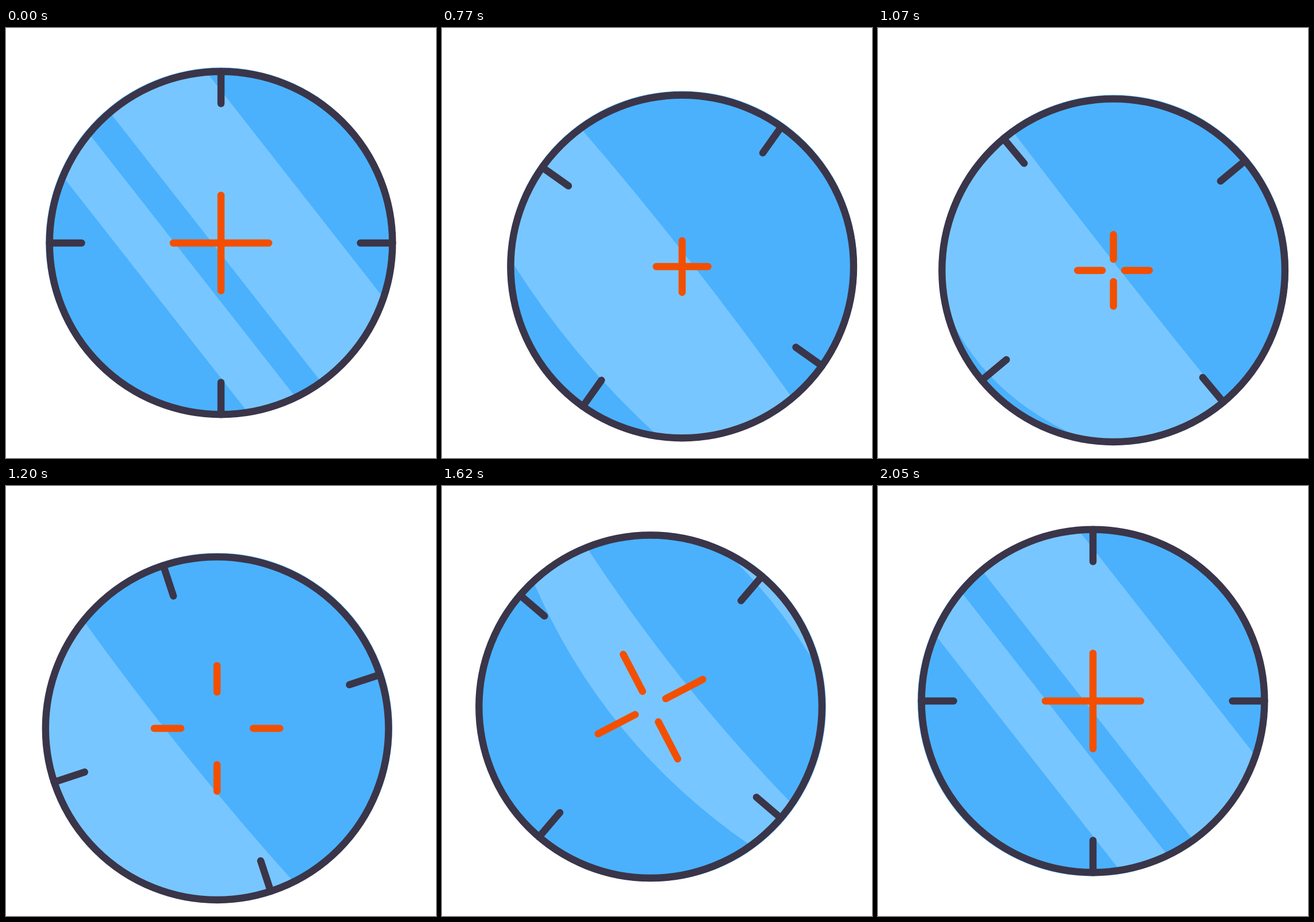
These frames come from a looping animation (748x748 px, 2070 ms). An HTML page with a canvas:

```html
<!DOCTYPE html>
<html lang="en">
<head>
<meta charset="utf-8">
<title>Scope</title>
<style>
  html, body { margin: 0; width: 100%; height: 100%; overflow: hidden; background: #fff; }
  canvas { display: block; width: 100vmin; height: 100vmin; }
</style>
</head>
<body>
<canvas id="stage" width="748" height="748"></canvas>
<script>
const ctx = document.getElementById('stage').getContext('2d');
const LOOP = 2070, HOME = 374, RAD = Math.PI / 180;
const BLUE = '#4bb1fd', SHINE = '#78c6ff', DARK = '#3a3549', ORANGE = '#f34f00';
const RING = 298.3, TICK = 242.5, STROKE = 12.4;

// Progress from 0 to 1 between two steps, plain or eased at both ends.
const ramp = (n, from, to) => Math.min(1, Math.max(0, (n - from) / (to - from)));
const ease = (n, from, to) => {
  const t = ramp(n, from, to);
  return t * t * (3 - 2 * t);
};
const mix = (a, b, t) => a + (b - a) * t;

// Out to the lower right, along a shallow arc to the left, then home.
function lensAt(n) {
  const out = ramp(n, 0, 11), across = ease(n, 20.4, 34.4);
  const arc = ramp(n, 12, 40), stay = 1 - ease(n, 40, 47.4);
  return {
    x: mix(43.7 * out, -46, across) * stay,
    y: (mix(41 * out, 39.5, arc) + 7.7 * Math.sin(Math.PI * arc)) * stay
  };
}

const tickAngle = n =>
  45 * ramp(n, 0, 14) + 45 * ease(n, 20, 34.2) + 180 * ramp(n, 40.06, 62);

// The cross shrinks, splits into four dashes, then spins shut.
function crossAt(n) {
  const shrink = ramp(n, 0, 12), split = ease(n, 18.4, 34.5), shut = ease(n, 40, 47.9);
  const inner = 98 * split * (1 - shut);
  const size = mix(mix(83 - 41.5 * shrink, 49, split), 83, shut);
  return { inner, outer: inner + size, spin: 90 * shut };
}

// A band edge: distance from the lens centre at its upper end, middle and lower end.
const edge = (mid, bow = 0, tilt = 0) => ({ top: mid + bow - tilt, mid, end: mid + bow + tilt });

// Two bands slide off to the lower left; two more follow and settle in their place.
function bandsAt(n) {
  const leave = ramp(n, 0, 11) ** 2, drift = ramp(n, 11, 23);
  const cross = ease(n, 20, 34.2) ** 1.5, left = (1 - ramp(n, 40, 50)) ** 3;
  return [
    [edge(-145 - 387 * leave), edge(-63.4 - 314 * leave)],
    [edge(-12 - 223 * leave - 40 * drift - 200 * cross, 31 * leave + 81 * drift, 8 * leave + 10 * drift),
     edge(163.6 - 147 * leave - 192 * cross - 200 * (1 - left), 9 * drift - 7 * leave + 14 * cross, 8 * cross)],
    [edge(-145 + 664 * left, 350 * left, 56 * left), edge(-63.4 + 1090 * left, 120 * left, 24 * left)],
    [edge(-12 + 2328 * left, -400 * left), edge(163.6 + 2400 * left)]
  ];
}

function disc(x, y, r) {
  ctx.beginPath();
  ctx.arc(x, y, r, 0, 2 * Math.PI);
}

function spokes(from, to, angle, color) {
  ctx.save();
  ctx.rotate(angle * RAD);
  ctx.strokeStyle = color;
  ctx.beginPath();
  for (let i = 0; i < 4; i++) {
    ctx.moveTo(0, -from);
    ctx.lineTo(0, -to);
    ctx.rotate(Math.PI / 2);
  }
  ctx.stroke();
  ctx.restore();
}

function shine(n) {
  const S = 300, bend = e => 2 * e.mid - (e.top + e.end) / 2;
  ctx.save();
  disc(0, 0, RING);
  ctx.clip();
  ctx.rotate(-38.1 * RAD);
  ctx.fillStyle = SHINE;
  for (const [l, r] of bandsAt(n)) {
    ctx.beginPath();
    ctx.moveTo(l.top, -S);
    ctx.quadraticCurveTo(bend(l), 0, l.end, S);
    ctx.lineTo(r.end, S);
    ctx.quadraticCurveTo(bend(r), 0, r.top, -S);
    ctx.fill();
  }
  ctx.restore();
}

function draw(n) {
  const { x, y } = lensAt(n), { inner, outer, spin } = crossAt(n), angle = tickAngle(n);
  ctx.fillStyle = '#fff';
  ctx.fillRect(0, 0, 748, 748);
  ctx.save();
  ctx.translate(HOME + x, HOME + y);
  ctx.lineWidth = STROKE;
  ctx.lineCap = 'round';

  // The glass sits slightly off centre and turns with the ring.
  const lean = (angle - 30) * RAD;
  ctx.fillStyle = BLUE;
  disc(1.1 * Math.sin(lean), -1.1 * Math.cos(lean), 304.2);
  ctx.fill();
  shine(n);

  ctx.strokeStyle = DARK;
  disc(0, 0, RING);
  ctx.stroke();
  spokes(TICK, RING, angle, DARK);
  spokes(inner, outer, spin, ORANGE);
  ctx.restore();
}

// The motion runs in steps of 25 ms on a 10 ms clock, after a rest of 20 steps.
function frame() {
  const t = Math.floor(performance.now() % LOOP / 10) * 10;
  draw(Math.max(0, Math.floor((t + 5) / 25) - 20));
  requestAnimationFrame(frame);
}
frame();
</script>
</body>
</html>
```
